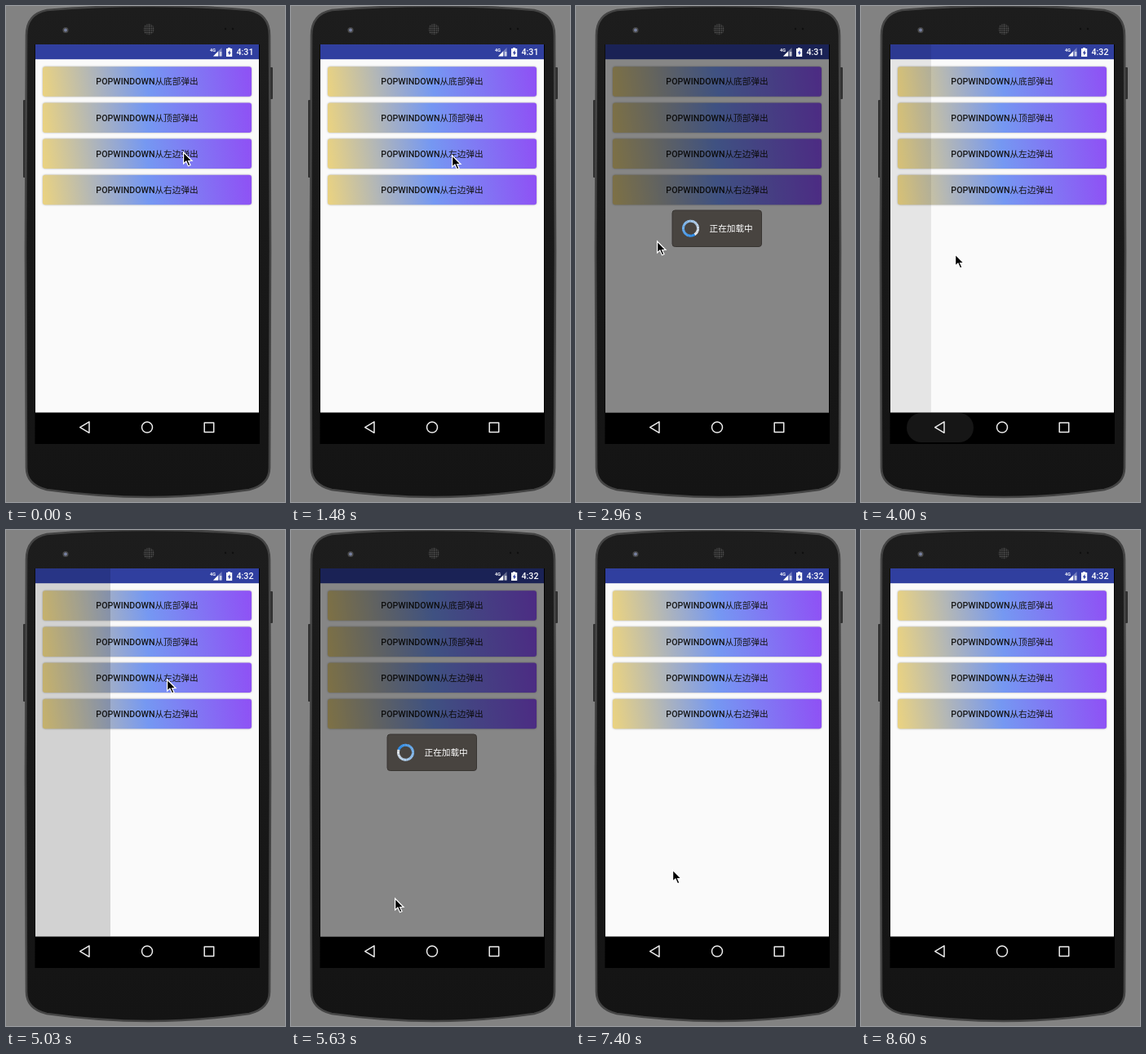
These frames come from a looping animation (342 by 607 pixels, 9030 ms). An HTML page:

```html
<!DOCTYPE html>
<html lang="zh">
<head>
<meta charset="utf-8">
<title>Popup window demo</title>
<style>
  html, body { margin: 0; width: 100%; height: 100%; overflow: hidden; background: #828282; }
  svg { display: block; width: 342px; height: 607px; }
  text { font-family: Roboto, "Noto Sans CJK SC", "Noto Sans CJK", sans-serif; font-size: 10.65px; }
  .strong { font-weight: 500; }
  .light { font-weight: 400; }
  .button { filter: drop-shadow(0 .7px .8px rgba(0, 0, 0, .3)); }
</style>
</head>
<body>
<svg viewBox="0 0 342 607" xmlns="http://www.w3.org/2000/svg">
  <defs>
    <linearGradient id="fill" gradientUnits="userSpaceOnUse" x1="0" y1="36.5" x2="256" y2="0">
      <stop offset="0" stop-color="#ebd380"/>
      <stop offset=".5" stop-color="#7598f2"/>
      <stop offset="1" stop-color="#8f50f5"/>
    </linearGradient>
    <linearGradient id="shell" x2="0" y2="1">
      <stop offset="0" stop-color="#1d1d1d"/>
      <stop offset="1" stop-color="#141414"/>
    </linearGradient>
    <pattern id="mesh" width="2.6" height="2.6" patternUnits="userSpaceOnUse">
      <rect width="2.6" height="2.6" fill="#1c1c1c"/>
      <circle cx="1.3" cy="1.3" r=".8" fill="#606060"/>
    </pattern>
    <clipPath id="screen"><rect x="36" y="47" width="274" height="450.5"/></clipPath>
  </defs>

  <rect width="342" height="607" fill="#828282"/>
  <g fill="#303030">
    <rect x="21" y="115" width="4" height="95" rx="1"/>
    <rect x="323" y="75" width="4" height="39" rx="1"/>
  </g>
  <path d="M25 36Q25 10 50 5Q110 0 175 0T298 5Q323 10 323 36L324 300L323 565Q323 586 298 592Q235 601 175 601T50 592Q25 586 25 565L24 300Z"
        fill="url(#shell)" stroke="#444" stroke-width="2.600"/>
  <circle cx="73" cy="29.500" r="3.600" fill="#484848"/>
  <circle cx="73" cy="29.500" r="1.900" fill="#7780a0"/>
  <circle cx="175" cy="28.500" r="6.800" fill="url(#mesh)"/>
  <g fill="#101010"><circle cx="269" cy="28" r="1.200"/><circle cx="278" cy="28" r="1.200"/></g>

  <rect x="35.500" y="47" width="275.500" height="489" fill="#000"/>
  <rect x="36" y="65" width="274" height="432.500" fill="#fafafa"/>
  <rect x="36" y="47" width="274" height="18.200" fill="#303f9f"/>
  <g id="buttons"></g>

  <g clip-path="url(#screen)">
    <g id="popup">
      <rect x="36" y="47" width="274" height="451" fill="#000" opacity=".466"/>
      <g id="dialog">
        <rect x="118" y="250" width="109.500" height="44.500" rx="3.500" fill="#484440" stroke="#383532"/>
        <g id="spinner" fill="none" stroke-width="3"></g>
        <text x="163.500" y="276" fill="#fff">正在加载中</text>
      </g>
    </g>
  </g>

  <g fill="#fff">
    <text x="250" y="55.500" style="font-size:5.500px;font-weight:700">4G</text>
    <path d="M264.500 51V61.500H254Z" opacity=".35"/>
    <path d="M260 55.500V61.500H254Z"/>
    <path d="M262 56h2.500v5.500h-2.500z" opacity=".6"/>
    <path d="M272 51h3v1h2.200v10h-7.200v-10h2z"/>
    <path d="M274.500 54l-2.800 3.700h1.600v2.800l2.700-3.700h-1.500z" fill="#303f9f"/>
    <text id="clock" class="strong" x="282.500" y="60"></text>
  </g>

  <rect id="ripple" y="498" height="36" rx="18" fill="#fff"/>
  <g fill="none" stroke="#eee" stroke-width="1.500" stroke-linejoin="round" transform="translate(-.3 -.4)">
    <path d="M91 516L102.300 509.300V522.700Z"/>
    <circle cx="173.300" cy="516" r="6.500"/>
    <rect x="243.500" y="510.300" width="11.500" height="11.500"/>
  </g>
  <path id="cursor" d="M.6 1V15L3.900 12.100L6.500 17.800L9 16.800L6.600 11.500H11Z" fill="#000" stroke="#fff" stroke-width="1.200"/>
</svg>

<script>
const LOOP = 9030, TICK = 148.03, LAST_TICK = 60, SLIDE = 300;
const byId = id => document.getElementById(id);
const [popup, dialog, spinner, clock, ripple, cursor] =
  ['popup', 'dialog', 'spinner', 'clock', 'ripple', 'cursor'].map(byId);

const sessions = [{ open: 1509, close: 3781 }, { open: 4915, close: 6709 }];

// pointer moves in ticks; it rests between them
const pointerStart = [217, 178];
const pointerMoves = [
  { from: 0, to: 1, x: 213, y: 181 },
  { from: 6, to: 8, x: 197, y: 182 },
  { from: 15, to: 17, x: 210, y: 180 },
  { from: 17, to: 20, x: 99, y: 287 },
  { from: 20, to: 24, x: 96, y: 515 },
  { from: 25, to: 27, x: 115, y: 303 },
  { from: 27, to: 30, x: 197, y: 182 },
  { from: 35, to: 38, x: 127, y: 450 },
  { from: 38, to: 41, x: 94.5, y: 520 },
  { from: 46, to: 50, x: 118, y: 415 },
  { from: 50, to: 56, x: 269, y: 592 }
];

const clamp = u => Math.min(1, Math.max(0, u));
const ease = u => (1 - Math.cos(Math.PI * clamp(u))) / 2;

function buildButtons() {
  byId('buttons').innerHTML = ['底部', '顶部', '左边', '右边'].map((side, i) => `
    <g transform="translate(45 ${74.3 + i * 44.15})">
      <rect class="button" width="256" height="36.5" rx="3" fill="url(#fill)"/>
      <text class="strong" x="128" y="22.2" text-anchor="middle" fill="#161616">POPWINDOWN<tspan class="light">从${side}弹出</tspan></text>
    </g>`).join('');
}

function buildSpinner(segments = 40, radius = 9) {
  const point = a => `${radius * Math.sin(a)} ${-radius * Math.cos(a)}`;
  const step = 2 * Math.PI / segments;
  for (let i = 0; i < segments; i++) {
    const u = i / (segments - 1);
    spinner.innerHTML += `<path d="M${point(i * step)}A${radius} ${radius} 0 0 1 ${point((i + 1.1) * step)}"
      stroke="rgb(${40 + 198 * u},${142 + 98 * u},242)"/>`;
  }
}

function pointerAt(tick) {
  return pointerMoves.reduce(([x, y], move) => {
    const u = clamp((tick - move.from) / (move.to - move.from));
    return [x + (move.x - x) * u, y + (move.y - y) * u];
  }, pointerStart);
}

function render(tick) {
  const time = tick * TICK;
  const { open, close } = sessions.findLast(s => time >= s.open) || sessions[0];
  const shown = ease((time - open) / SLIDE) - ease((time - close) / SLIDE);
  popup.setAttribute('transform', `translate(${(shown - 1) * 274} 0)`);
  popup.setAttribute('opacity', shown);
  dialog.setAttribute('visibility', time > open + SLIDE ? 'visible' : 'hidden');
  const angle = 75 + 43 * (tick - Math.floor(open / TICK));
  spinner.setAttribute('transform', `translate(140.5 272.2) rotate(${angle})`);

  // the back key glows for three ticks around each dismissal
  const age = tick - Math.floor(close / TICK);
  const inset = age === 0 ? 7 : 0;
  ripple.setAttribute('opacity', .12 * Math.sin(Math.PI * clamp((age + 1) / 4)));
  ripple.setAttribute('x', 56 + inset);
  ripple.setAttribute('width', 82 - 2 * inset);

  clock.textContent = time < sessions[0].close ? '4:31' : '4:32';
  cursor.setAttribute('transform', `translate(${pointerAt(tick)})`);
  cursor.setAttribute('visibility', tick < 58 ? 'visible' : 'hidden');
}

buildButtons();
buildSpinner();
const start = performance.now();
function frame() {
  const time = (performance.now() - start) % LOOP;
  render(Math.min(LAST_TICK, Math.floor((time + 10) / TICK)));
  requestAnimationFrame(frame);
}
frame();
</script>
</body>
</html>
```
